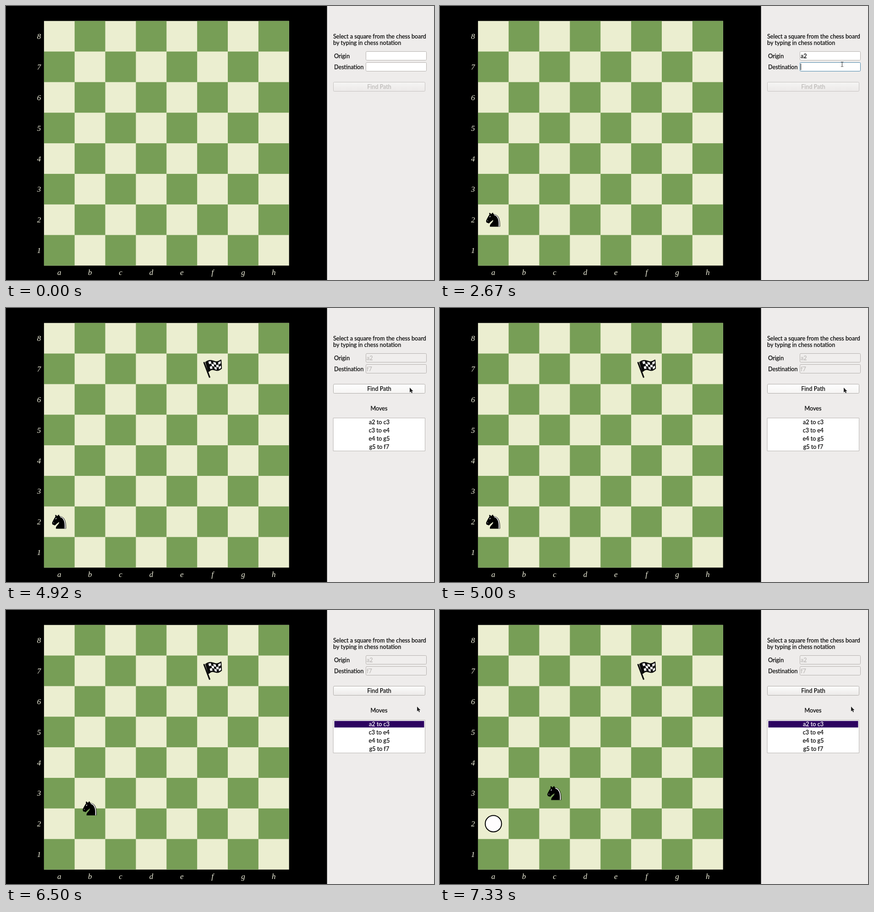
Write an HTML page with a canvas that moves like this. It is 934x599 px and loops after 8000 ms.

```html
<!DOCTYPE html>
<html lang="en">
<head>
<meta charset="utf-8">
<title>Knight path finder</title>
<style>
  html, body { margin: 0; width: 100%; height: 100%; overflow: hidden; background: #000; }
  canvas { display: block; }
</style>
</head>
<body>
<canvas id="stage" width="934" height="599"></canvas>
<script>
const ctx = document.getElementById('stage').getContext('2d');
const LOOP = 8000, FPS = 12;
const LEFT = 82.9, TOP = 32.7, CELL = 66.85;
const UI_FONT = '12.6px Lato, sans-serif';
const LABEL_FONT = 'italic 17px "Liberation Serif", serif';
const INK = '#080808', FAINT = '#bdbab8', CREAM = '#f0f0dc';
const MOVES = ['a2 to c3', 'c3 to e4', 'e4 to g5', 'g5 to f7'];

// Events, in ticks of 1/12 s
const FOCUS_ORIGIN = 15, TYPE_A = 21, TYPE_2 = 24, FOCUS_DEST = 31, BLINK = 40,
      TYPE_F = 42, TYPE_7 = 47, HOVER = 55, PRESS = 57, SOLVED = 59, LEAVE = 63,
      SELECT = 73, VISITED = 88;
const SLIDE_START = 72, SLIDE_TICKS = 12;

// Pointer: [tick, x, y]
const POINTER = [
  [5, 926, 142], [6, 908, 134], [7, 894, 125], [9, 888, 119], [10, 881, 113], [11, 878.5, 111],
  [25, 878.5, 110.5], [28, 877.5, 125], [31, 877.5, 126.5], [32, 877.5, 127.5],
  [51, 879.5, 132], [52, 880, 148], [53, 881, 165], [55, 881, 169], [57, 881, 174],
  [62, 883, 178], [63, 889, 190], [64, 894, 203], [65, 897, 211]
];

const KNIGHT_BODY = new Path2D('M22 10C32.5 11 38.5 18 38 39L15 39C15 30 25 32.5 23 18L24 18C24.4 20.9 18.5 25.4 16 27C13 29 13.2 31.3 11 31C10 30 12.4 28 11 28C10 28 11.2 29.2 10 30C9 30 6 31 6 26C6 24 12 14 12 14C12 14 13.9 12.1 14 10.5C13.3 9.5 13.5 8.5 13.5 7.5C14.5 6.5 16.5 10 16.5 10L18.5 10C18.5 10 19.3 8 21 7C22 7 22 10 22 10Z');
const KNIGHT_MANE = new Path2D('M24.5 10.4L24.1 11.9C27.8 13 30.2 14.5 32.5 18.8C34.8 23 35.8 29 35.2 39.5L37.4 39.5C38 29 36.6 22.2 34.2 17.7C31.9 13.2 28.5 11 24.5 10.4Z');
const ARROW = new Path2D('M0 0V10.8L2.5 8.6L4.3 12.6L6.1 11.8L4.4 7.9H7.6Z');
const I_BEAM = new Path2D('M-2.5 -5H-.7L0 -4.4L.7 -5H2.5M0 -4.5V4.5M-2.5 5H-.7L0 4.4L.7 5H2.5');

const center = square => [
  LEFT + (square.charCodeAt(0) - 96.5) * CELL,
  TOP + (8.5 - square[1]) * CELL
];

function text(str, x, y, color = INK, align = 'left') {
  ctx.font = UI_FONT;
  ctx.textAlign = align;
  ctx.fillStyle = ctx.strokeStyle = color;
  ctx.lineWidth = 0.25;
  ctx.fillText(str, x, y);
  ctx.strokeText(str, x, y);
}

function boardLabel(str, x, y) {
  ctx.font = LABEL_FONT;
  ctx.textAlign = 'center';
  ctx.fillStyle = CREAM;
  ctx.fillText(str, x, y);
}

function box(x, y, w, h, fill, stroke, radius = 2) {
  ctx.beginPath();
  ctx.roundRect(x + 0.5, y + 0.5, w - 1, h - 1, radius);
  ctx.fillStyle = fill;
  ctx.fill();
  ctx.strokeStyle = stroke;
  ctx.lineWidth = 1;
  ctx.stroke();
}

function drawBoard() {
  ctx.fillStyle = '#000';
  ctx.fillRect(0, 0, 934, 599);
  ctx.fillStyle = '#ebeed0';
  ctx.fillRect(LEFT, TOP, 8 * CELL, 8 * CELL);
  ctx.fillStyle = '#779e56';
  for (let row = 0; row < 8; row++) {
    for (let col = 1 - row % 2; col < 8; col += 2) {
      ctx.fillRect(LEFT + col * CELL, TOP + row * CELL, CELL, CELL);
    }
  }
  for (let i = 0; i < 8; i++) {
    const mid = (i + 0.5) * CELL;
    boardLabel(8 - i, 72, TOP + mid + 6);
    boardLabel('abcdefgh'[i], LEFT + mid, 587.5);
  }
}

function drawKnight(x, y) {
  ctx.save();
  ctx.translate(x, y - 0.5);
  ctx.scale(0.91, 0.91);
  ctx.translate(-22.5, -22.5);
  ctx.fillStyle = ctx.strokeStyle = '#000';
  ctx.lineWidth = 1.5;
  ctx.lineJoin = 'round';
  ctx.fill(KNIGHT_BODY);
  ctx.stroke(KNIGHT_BODY);
  ctx.fillStyle = '#fff';
  ctx.fill(KNIGHT_MANE);
  ctx.beginPath();
  ctx.arc(9, 25.5, 0.9, 0, 7);
  ctx.fill();
  ctx.beginPath();
  ctx.ellipse(14.6, 15.6, 0.9, 1.8, Math.PI / 6, 0, 7);
  ctx.fill();
  ctx.restore();
}

// Point on the waving cloth, u across and v down, both 0..1
const cloth = (u, v) => [
  436 + 33 * u + v * (6 - 5 * u),
  118.5 - 4.5 * u - 2.5 * Math.sin(2 * Math.PI * u) + v * (20 - 2 * u)
];

function clothPatch(u0, v0, u1, v1) {
  const steps = 8;
  ctx.beginPath();
  for (let i = 0; i <= steps; i++) ctx.lineTo(...cloth(u0 + (u1 - u0) * i / steps, v0));
  for (let i = steps; i >= 0; i--) ctx.lineTo(...cloth(u0 + (u1 - u0) * i / steps, v1));
  ctx.closePath();
}

function drawFlag() {
  const cols = 5, rows = 3;
  const across = i => 0.16 + 0.82 * i / cols, down = j => 0.08 + 0.84 * j / rows;
  ctx.strokeStyle = ctx.fillStyle = '#0b0b0b';
  ctx.lineCap = ctx.lineJoin = 'round';
  ctx.lineWidth = 3.2;
  ctx.beginPath();
  ctx.moveTo(432.3, 119.5);
  ctx.lineTo(444.2, 151);
  ctx.stroke();
  ctx.lineWidth = 2.4;
  clothPatch(0, 0, 1, 1);
  ctx.fill();
  ctx.stroke();
  ctx.fillStyle = '#fff';
  for (let i = 0; i < cols; i++) {
    for (let j = i % 2; j < rows; j += 2) {
      clothPatch(across(i), down(j), across(i + 1), down(j + 1));
      ctx.fill();
    }
  }
}

function drawField(label, y, value, focused, caret, disabled) {
  text(label, 716, y + 14.5);
  box(785, y, 133, 20, disabled ? '#f0eeed' : '#fff', focused ? '#4a86ab' : '#b5b1ae');
  text(value, 787, y + 14.5, disabled ? FAINT : INK);
  if (focused && caret) {
    ctx.fillStyle = INK;
    ctx.fillRect(Math.round(787 + ctx.measureText(value).width), y + 3, 1, 14);
  }
}

function drawButton(enabled, hovered, pressed) {
  const shade = ctx.createLinearGradient(0, 166, 0, 187);
  shade.addColorStop(0, pressed ? '#dddbd9' : hovered ? '#fff' : enabled ? '#fdfdfc' : '#f6f5f4');
  shade.addColorStop(1, pressed ? '#dddbd9' : hovered ? '#f5f4f3' : '#ebe9e8');
  box(714, 166, 201, 21, shade, enabled ? '#b0adaa' : '#c6c3c1');
  text('Find Path', 814.5, 181, enabled ? INK : FAINT, 'center');
}

function drawMoves(selected) {
  text('Moves', 814, 224, INK, 'center');
  box(714, 240, 201, 73, '#fff', '#b9b6b3', 0);
  if (selected) {
    ctx.fillStyle = '#2c0260';
    ctx.fillRect(716.5, 242.5, 196, 14.3);
  }
  MOVES.forEach((move, i) =>
    text(move, 814.5, 254 + 18 * i, selected && i === 0 ? '#fff' : INK, 'center'));
}

function drawPanel(tick) {
  ctx.fillStyle = '#eeeceb';
  ctx.fillRect(700.6, 0, 234, 599);
  text('Select a square from the chess board', 714, 71);
  text('by typing in chess notation', 714, 85);

  const solved = tick >= SOLVED;
  const origin = tick >= TYPE_2 ? 'a2' : tick >= TYPE_A ? 'a' : '';
  const target = tick >= TYPE_7 ? 'f7' : tick >= TYPE_F ? 'f' : '';
  const caret = tick < BLINK || tick >= TYPE_F;
  drawField('Origin', 99, origin, tick >= FOCUS_ORIGIN && tick < FOCUS_DEST, caret, solved);
  drawField('Destination', 123, target, tick >= FOCUS_DEST && tick < PRESS, caret, solved);
  drawButton(tick >= TYPE_7, tick >= HOVER && tick < LEAVE, tick >= PRESS && tick < SOLVED);
  if (solved) drawMoves(tick >= SELECT);
}

function drawPointer(tick) {
  const spot = POINTER.filter(p => p[0] <= tick).pop();
  if (!spot) return;
  const [, x, y] = spot;
  ctx.save();
  ctx.translate(x, y);
  ctx.lineCap = 'butt';
  if (tick > 5 && tick < 52) {
    ctx.strokeStyle = '#333';
    ctx.lineWidth = 1;
    ctx.stroke(I_BEAM);
  } else {
    ctx.strokeStyle = '#fff';
    ctx.lineWidth = 1.2;
    ctx.stroke(ARROW);
    ctx.fillStyle = '#222';
    ctx.fill(ARROW);
  }
  ctx.restore();
}

function drawPieces(tick) {
  const [ax, ay] = center('a2'), [cx, cy] = center('c3');
  if (tick >= VISITED) {
    ctx.beginPath();
    ctx.arc(ax + 0.2, ay - 0.1, 17.8, 0, 7);
    ctx.fillStyle = '#fffdfe';
    ctx.fill();
    ctx.strokeStyle = '#000';
    ctx.lineWidth = 2;
    ctx.stroke();
  }
  if (tick >= TYPE_7) drawFlag();
  if (tick >= TYPE_2) {
    const u = Math.min(1, Math.max(0, (tick - SLIDE_START) / SLIDE_TICKS));
    const eased = u < 0.5 ? 2 * u * u : 1 - 2 * (1 - u) ** 2;
    drawKnight(ax + (cx - ax) * eased, ay + (cy - ay) * eased);
  }
}

function render(now) {
  const tick = Math.floor((now % LOOP + 3.4) * FPS / 1000);
  drawBoard();
  drawPanel(tick);
  drawPieces(tick);
  drawPointer(tick);
  requestAnimationFrame(render);
}
requestAnimationFrame(render);
</script>
</body>
</html>
```
